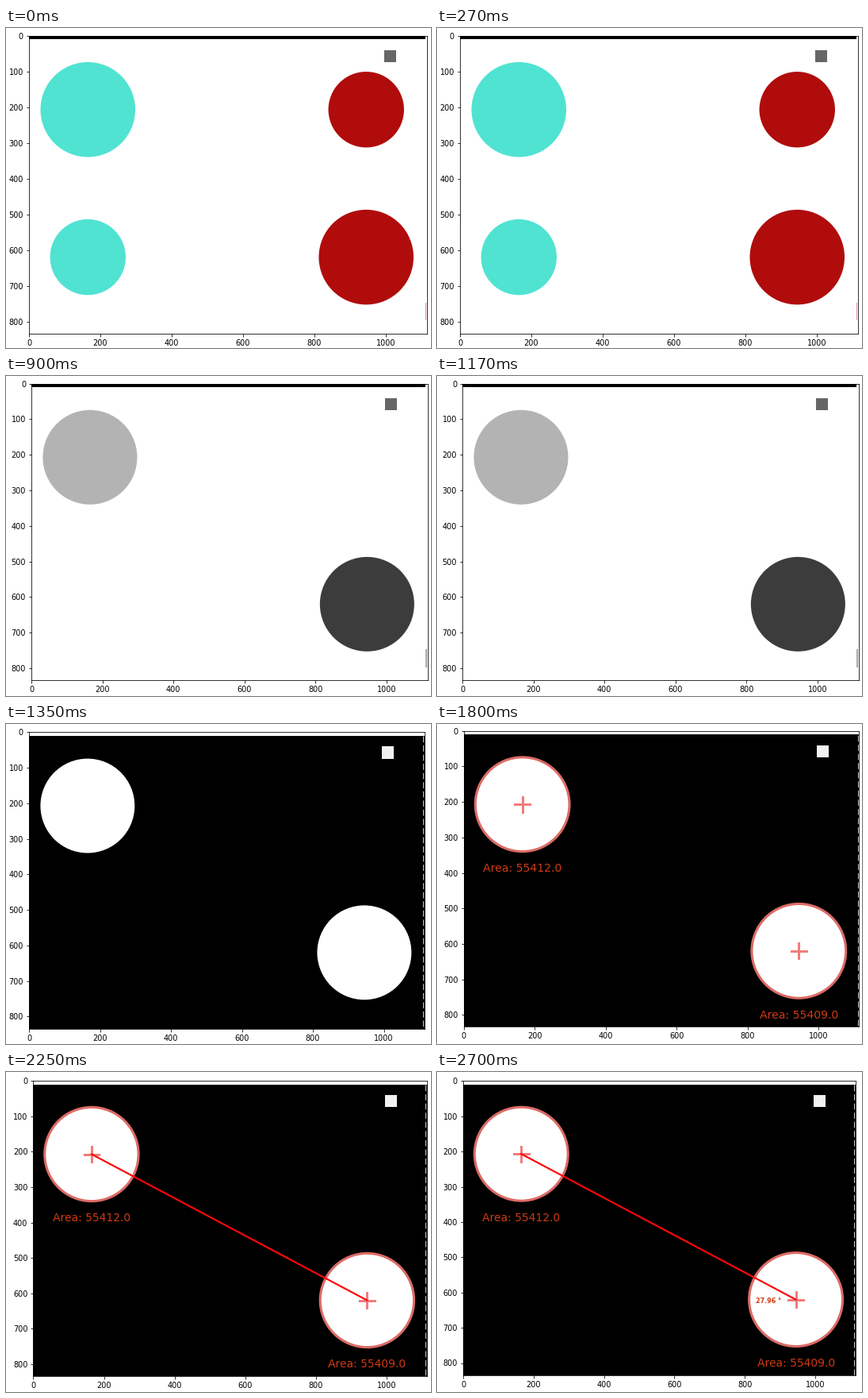
Write a matplotlib script that moves like this. It is 536 px wide and 403 px high and loops after 3150 ms.

```python
import matplotlib.pyplot as plt
from matplotlib.animation import FuncAnimation
from matplotlib.patches import Circle, Rectangle

DPI = 64
PX = 72 / DPI                      # points per pixel
STAGE_W, STAGE_H = 536, 403
IMG_W, IMG_H = 1115, 834

TEAL, RED = "#50e3d2", "#b00c0c"
OUTLINE, CROSS = "#dc6b66", "#f27c7c"
LINK, LABEL = "#fa0a0a", "#d03a12"

TOP_LEFT, BOTTOM_RIGHT = (165, 207), (945, 620)
AREAS = {TOP_LEFT: 55412.0, BOTTOM_RIGHT: 55409.0}
BIG, SMALL = 132.8, 106

# Image corner in pixels and image scale for each step
VIEWS = [
    (29, 9.6, 0.45), (33, 15, 0.4425), (32, 9.6, 0.448), (29, 10.4, 0.4475),
    (33.9, 8.7, 0.447), (34.4, 11.3, 0.4455), (33, 11.3, 0.444),
]

fig = plt.figure(figsize=(STAGE_W / DPI, STAGE_H / DPI), dpi=DPI, facecolor="white")
ax = fig.add_axes([0, 0, 1, 1])


def setup_axes(left, top, scale):
    w, h = IMG_W * scale, IMG_H * scale
    ax.clear()
    ax.set_position([left / STAGE_W, 1 - (top + h) / STAGE_H, w / STAGE_W, h / STAGE_H])
    ax.set_xlim(0, IMG_W)
    ax.set_ylim(IMG_H, 0)
    ax.set_xticks(range(0, IMG_W, 200))
    ax.set_yticks(range(0, IMG_H, 100))
    ax.tick_params(length=3.5 * PX, pad=3.5 * PX, width=0.8 * PX,
                   labelsize=9.8 * PX, labelfontfamily="DejaVu Sans")
    for spine in ax.spines.values():
        spine.set_linewidth(0.8 * PX)


def stroke(start, end, color, width, z, **style):
    ax.plot(*zip(start, end), color=color, lw=width * PX, zorder=z, **style)


def block(x, y, w, h, color):
    ax.add_patch(Rectangle((x, y), w, h, fc=color, lw=0, zorder=1))


def disc(center, radius, color):
    ax.add_patch(Circle(center, radius, fc=color, lw=0, zorder=1))


def write(text, x, y, size, **style):
    ax.text(x, y, text, color=LABEL, fontsize=size * PX, family="DejaVu Sans",
            va="baseline", **style)


def scene(first, second, badge):
    block(995, 40, 34, 34, badge)
    disc(TOP_LEFT, BIG, first)
    disc(BOTTOM_RIGHT, BIG, second)


def light_scene(first, second, edge):
    block(0, 0, 1110, 10.5, "black")
    block(1110, 747, 3, 50, edge)
    scene(first, second, "#666666")


def dark_scene():
    block(0, 10.5, IMG_W, IMG_H, "black")
    stroke((1111, 11), (1111, IMG_H), "#c4c4c4", 1.1, 1.5, dashes=(7, 3.5))
    scene("white", "white", "#f2f2f2")


def measure(scale):
    for (x, y), area in AREAS.items():
        ax.add_patch(Circle((x, y), BIG, fill=False, ec=OUTLINE, lw=3.1 * PX, zorder=2))
        stroke((x - 21, y), (x + 21, y), CROSS, 3, 2.1)
        stroke((x, y - 21), (x, y + 21), CROSS, 3, 2.1)
        write(f"Area: {area}", x, y + 190, 31.3 * scale, ha="center")


def draw(step):
    left, top, scale = VIEWS[step]
    setup_axes(left, top, scale)
    if step < 2:
        light_scene(TEAL, RED, "#e08c96")
    elif step == 2:
        light_scene("#b3b3b3", "#3c3c3c", "#a6a6a6")
    else:
        dark_scene()
    if step == 0:
        disc((BOTTOM_RIGHT[0], TOP_LEFT[1]), SMALL, RED)
        disc((TOP_LEFT[0], BOTTOM_RIGHT[1]), SMALL, TEAL)
    if step >= 4:
        measure(scale)
    if step >= 5:
        stroke(TOP_LEFT, BOTTOM_RIGHT, LINK, 2.2, 2.2)
    if step == 6:
        write("27.96 °", 831, 631, 18 * scale, weight="bold")


anim = FuncAnimation(fig, draw, frames=len(VIEWS), interval=450,
                     repeat=True, repeat_delay=0, blit=False)
plt.show()
```
